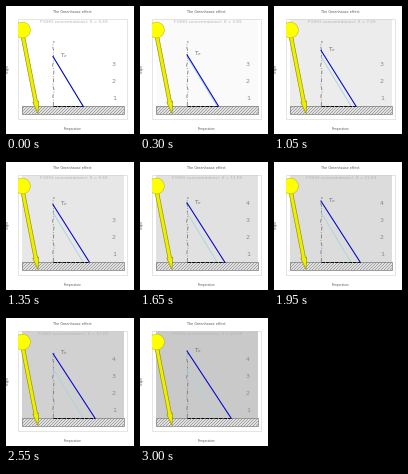
These frames come from a looping animation (128x128 px, 3.15 s). A matplotlib script:

```python
import numpy as np
import matplotlib.pyplot as plt
from matplotlib.animation import FuncAnimation
from matplotlib.patches import Circle, Polygon, Rectangle

SIZE = 128
FRAMES = 21
STEP = 150
PT = 72 / SIZE          # points per pixel

plt.rcParams["font.family"] = "DejaVu Sans"
plt.rcParams["mathtext.fontset"] = "dejavusans"

fig = plt.figure(figsize=(1, 1), dpi=SIZE, facecolor="white")
ax = fig.add_axes([0, 0, 1, 1])
ax.set_xlim(0, SIZE)
ax.set_ylim(SIZE, 0)
ax.axis("off")

LEFT, GROUND, FLOOR = 47, 100, 108
OLIVE = "#8c8c00"


def label(x, y, text, size, color="0.35", **kw):
    return ax.text(x, y, text, fontsize=size * PT, color=color,
                   ha="center", va="center", **kw)


def line(xs, ys, color, width, **kw):
    return ax.plot(xs, ys, color=color, lw=width * PT, **kw)[0]


def profile(i):
    """Top height and surface position of the temperature line."""
    k = i / (FRAMES - 1)
    return 50.5 - 17.5 * k, 77 + 14 * k


# sky, frame and ground
sky = ax.add_patch(Rectangle((16, 12.5), 102, GROUND - 12.5, lw=0, zorder=0))
frame = ax.add_patch(Rectangle((12.2, 12.5), 109, 100, fill=False,
                               ec="0.8", lw=0.5 * PT, zorder=1))
soil = ax.add_patch(Rectangle((16, GROUND), 102, FLOOR - GROUND, fc="0.92",
                              ec="0.4", lw=0.6 * PT, zorder=2))
for x in np.arange(8, 118, 3):
    stroke = line([x, x + 8], [FLOOR, GROUND], "0.5", 0.6, zorder=3)
    stroke.set_clip_path(soil)

# sun and its ray
sun = ax.add_patch(Circle((16.4, 24), 7.9, fc="#ffff00", ec="#b8b800",
                          lw=0.5 * PT, zorder=5))
sun.set_clip_path(frame)

start, tip = np.array([17, 31]), np.array([32, 107.5])
along = (tip - start) / np.hypot(*(tip - start))
side = np.array([-along[1], along[0]])
neck = tip - 12 * along
ray = [start + 1.8 * side, neck + 1.8 * side, neck + 3 * side, tip,
       neck - 3 * side, neck - 1.8 * side, start - 1.8 * side]
ax.add_patch(Polygon(ray, fc="#eeee00", ec=OLIVE, lw=0.6 * PT, zorder=4))

# fixed lines and texts
top0, foot0 = profile(0)
heights = np.linspace(GROUND, 35, 60)
wiggle = 0.7 * np.sin(heights * 0.5) * np.sin(heights * 0.13)
line(LEFT + 0.4 + wiggle, heights, "0.45", 0.8, ls=(0, (5, 2, 1, 2)), zorder=4)
line([LEFT, foot0], [top0, GROUND], "#a8d4e0", 0.9, zorder=4)
label(66.8, 6.3, "The Greenhouse effect", 3.4)
label(67, 123, "Temperature", 2.7)
label(2.2, 62, "Height", 2.7, rotation=90)

# moving parts
base = line([], [], "black", 0.9, ls=(0, (4, 1)), zorder=5)
slope = line([], [], "#0000d0", 1.05, zorder=6)
mark = label(57.6, 49, r"$\mathrm{T}_e$", 6, "0.45", zorder=6)
caption = label(67.5, 15.8, "", 4.1, "0.7", zorder=4)
levels = [label(108, 92 - 16.7 * n, str(n + 1), 6.4, "0.55", zorder=4)
          for n in range(4)]


def update(i):
    top, foot = profile(i)
    sky.set_facecolor(str(round(1 - 0.0106 * i, 4)))
    slope.set_data([LEFT, foot], [top, GROUND])
    base.set_data([LEFT, foot], [GROUND, GROUND])
    mark.set_position((57.6, top - 0.8))
    caption.set_text(f"F(GHG concentrations): X = {i + 0.69:.2f}")
    levels[3].set_visible(i >= 10)
    return sky, slope, base, mark, caption, *levels


anim = FuncAnimation(fig, update, frames=FRAMES, interval=STEP,
                     init_func=lambda: update(0), repeat=True, repeat_delay=0)
plt.show()
```
